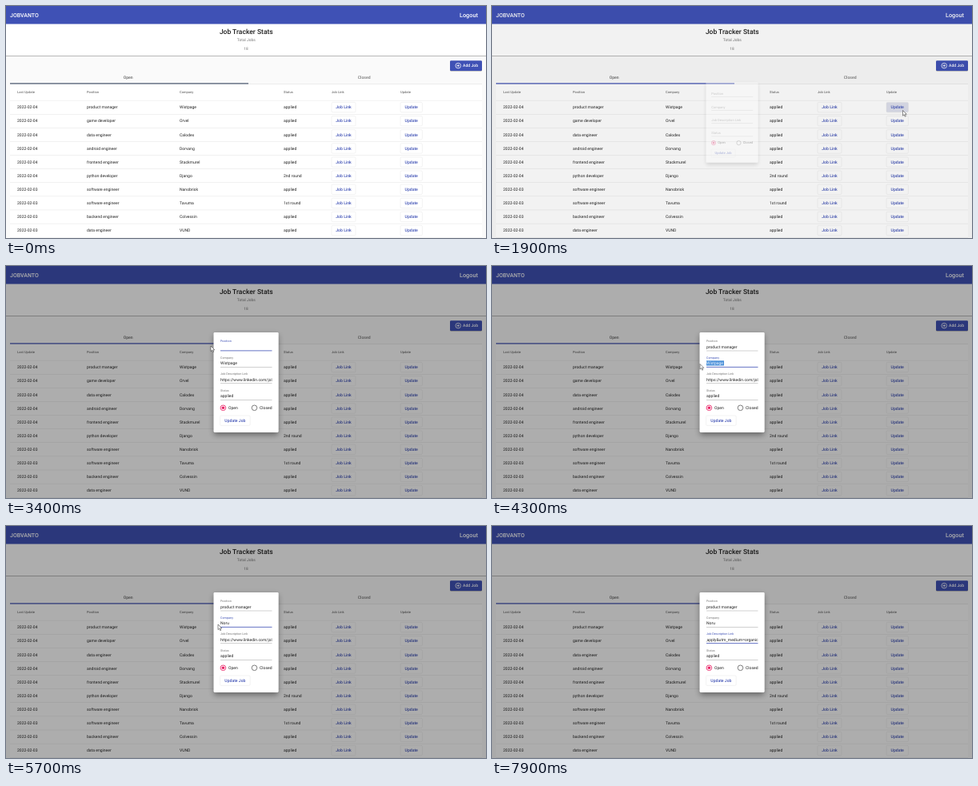
Write an HTML page that moves like this. It is 600 by 290 pixels and loops after 8000 ms.

```html
<!DOCTYPE html>
<html lang="en">
<head>
<title>Job Tracker</title>
<style>
  html, body { margin: 0; width: 100%; height: 100%; overflow: hidden; background: #fafafa; }
  svg { display: block; width: 600px; height: 290px; }
  text { font-family: Roboto, "Open Sans", sans-serif; text-rendering: geometricPrecision; white-space: pre; }
</style>
</head>
<body>
<svg id="stage" viewBox="0 0 600 290" xmlns="http://www.w3.org/2000/svg">
  <defs>
    <filter id="soft" x="-30%" y="-30%" width="160%" height="160%"><feGaussianBlur stdDeviation="3.5"/></filter>
    <filter id="thin" x="-10%" y="-30%" width="120%" height="170%"><feGaussianBlur stdDeviation="0.7"/></filter>
    <clipPath id="input"><rect x="267.8" y="84" width="64.8" height="90"/></clipPath>
  </defs>
  <g id="page"></g>
  <rect id="scrim" width="600" height="290" opacity="0"/>
  <g id="dialog"></g>
  <path id="cursor" d="M0 0V6.6L1.6 5.2L2.7 7.7L3.8 7.2L2.7 4.8H4.8Z" fill="#fff" stroke="#333" stroke-width=".55" stroke-linejoin="round"/>
</svg>
<script>
const LOOP = 8000, STEP = 100;
const INDIGO = '#3f51b5', PINK = '#e91e63', INK = '#212121', GRAY = '#757575';
const $ = id => document.getElementById(id);

// y is the vertical middle of the capitals
const text = (x, y, str, size = 5.05, fill = INK, extra = '') =>
  `<text x="${x}" y="${y + size * 0.35}" font-size="${size}" fill="${fill}" ${extra}>${str.replace(/&/g, '&amp;')}</text>`;
const rect = (x, y, w, h, fill, extra = '') =>
  `<rect x="${x}" y="${y}" width="${w}" height="${h}" fill="${fill}" ${extra}/>`;
const MID = 'text-anchor="middle"', BOLD = 'font-weight="500"';

const button = (x, y, w, label, id = '') =>
  rect(x, y - 6.2, w, 12.4, '#fff', `rx="1.4" stroke="#e0e0e0" stroke-width=".4" ${id}`) +
  text(x + w / 2, y, label, 5.1, INDIGO, `${MID} ${BOLD}`);

const columns = [14, 101, 217, 347, 407, 493];
const heads = ['Last Update', 'Position', 'Company', 'Status', 'Job Link', 'Update'];
const rows = [
  ['04', 'product manager', 'Wistpage', 'applied'],
  ['04', 'game developer', 'Orvel', 'applied'],
  ['04', 'data engineer', 'Calodex', 'applied'],
  ['04', 'android engineer', 'Dorvang', 'applied'],
  ['04', 'frontend engineer', 'Stackmurel', 'applied'],
  ['04', 'python developer', 'Django', '2nd round'],
  ['03', 'software engineer', 'Nanobrisk', 'applied'],
  ['03', 'software engineer', 'Tavuma', '1st round'],
  ['03', 'backend engineer', 'Colvessin', 'applied'],
  ['03', 'data engineer', 'VUND', 'applied'],
];

function drawPage() {
  let s = rect(0, 0, 600, 290, '#fafafa');
  s += rect(0, 22, 600, 41, '#000', 'opacity=".45" filter="url(#thin)"') + rect(0, 22, 600, 40.4, '#fff');
  s += rect(0, 0, 600, 22.5, INDIGO);
  s += text(5, 11.6, 'JOBVANTO', 7, '#fff', BOLD) + text(567, 11.6, 'Logout', 7.3, '#fff', BOLD);
  s += text(300.3, 32, 'Job Tracker Stats', 8.5, INK, `${MID} ${BOLD}`);
  s += text(300.3, 42, 'Total Jobs', 4.9, GRAY, MID) + text(300, 53.5, '18', 4.8, GRAY, MID);

  s += rect(555, 69, 40, 12.6, '#000', 'rx="1.4" opacity=".4" filter="url(#thin)"');
  s += rect(555, 68.3, 40, 12.6, INDIGO, 'rx="1.4"');
  s += '<g fill="none" stroke="#fff" stroke-width=".75"><circle cx="565.2" cy="74.6" r="3.3"/><path d="M563.4 74.6h3.6M565.2 72.8v3.6"/></g>';
  s += text(571, 74.6, 'Add Job', 5.1, '#fff', BOLD);

  s += text(152.7, 89.5, 'Open', 5.1, '#666', `${MID} ${BOLD}`) + text(447.7, 89.5, 'Closed', 5.1, '#777', `${MID} ${BOLD}`);
  s += rect(5, 98, 590, 192, '#fff') + rect(5, 97.4, 590, 0.4, '#d8d8d8');
  s += rect(5, 96.3, 298, 1.2, INDIGO, 'id="tabBar"');

  heads.forEach((h, i) => s += text(columns[i], 108, h, 4.1, GRAY, BOLD));
  rows.forEach(([day, ...cells], r) => {
    const y = 126.6 + r * 17.11;
    s += rect(5, y - 8.7, 590, 0.4, '#dcdcdc');
    ['2022-02-' + day, ...cells].forEach((c, i) => s += text(columns[i], y, c));
    s += button(407, y, 30, 'Job Link') + button(493, y, 27.4, 'Update', r ? '' : 'id="hover"');
  });
  s += rect(5, 289, 590, 0.4, '#dcdcdc');
  $('page').innerHTML = s;
}

const labels = ['Position', 'Company', 'Job Description Link', 'Status'];
const firstUrl = 'https://www.linkedin.com/jobs/view/';
const nextUrl = 'google_jobs_apply&utm_medium=organic';

// [start, value]; the last entry reached applies
const at = (table, t) => table.reduce((v, [start, value]) => t >= start ? value : v, table[0][1]);
const position = [[0, ''], [2000, 'product manager'], [3400, ''], [3700, 'product manager']];
const company = [[0, ''], [2000, 'Wistpage'], [4700, ''], [5000, 'N'], [5200, 'No'], [5300, 'Nor'], [5500, 'Noru']];
const link = [[0, ''], [2000, firstUrl], [7100, nextUrl]];
const focus = [[0, -1], [3000, 0], [4000, 1], [6200, 2]];
// [field, left edge, right edge]
const selection = [[0, null], [3100, [0, 286, 306.5]], [3300, [0, 268, 306.5]], [3400, null],
  [4100, [1, 279, 290]], [4200, [1, 268, 290]], [4700, null], [6400, [2, 268, 332.6]], [7100, null]];

function drawDialog(t) {
  const values = [at(position, t), at(company, t), at(link, t), t < 2000 ? '' : 'applied'];
  const active = at(focus, t), sel = at(selection, t), floats = t >= 2000;
  let s = rect(260, 86, 80, 125, '#000', 'rx="2" opacity=".42" filter="url(#soft)"');
  s += rect(259.5, 83, 81.2, 125, '#fff', 'rx="1.4"');

  labels.forEach((label, i) => {
    const y = 101 + i * 20.4, on = i === active;
    const marked = sel && sel[0] === i, end = values[i] === nextUrl;
    s += text(268, floats ? y - 7 : y, label, floats ? 3.78 : 5.05, on ? INDIGO : GRAY);
    s += rect(268, y + (on ? 4.5 : 4.8), 64.5, on ? 0.8 : 0.4, on ? INDIGO : '#8a8a8a');
    if (marked) s += rect(sel[1], y - 3.1, sel[2] - sel[1], 6.2, '#4a90d9');
    s += `<g clip-path="url(#input)">${text(end ? 332.7 : 268, y, values[i], 5.05, marked ? '#f4f8ff' : INK, end ? 'text-anchor="end"' : '')}</g>`;
  });

  s += `<g fill="none" stroke-width=".85"><circle cx="271.4" cy="177.3" r="3.3" stroke="${PINK}"/><circle cx="310.5" cy="177.3" r="3.3" stroke="#666"/></g>`;
  s += `<circle cx="271.4" cy="177.3" r="1.75" fill="${PINK}"/>`;
  s += text(278, 177.3, 'Open') + text(317, 177.3, 'Closed');
  s += button(267.6, 193.2, 37.6, 'Update Job');
  $('dialog').innerHTML = s;
}

// [time, x, y] of the pointer tip
const path = [
  [400, 540, 168], [900, 524, 148], [1400, 513.5, 130.5], [2200, 513.5, 130.5],
  [2900, 308, 99], [3300, 256, 100], [3500, 256, 100], [4000, 292, 121],
  [4300, 260, 122.5], [4500, 260, 122.5], [4700, 265, 123], [5700, 265, 123],
  [5900, 284, 150], [6200, 298, 139.5], [LOOP, 298, 139.5],
];

function pointerAt(t) {
  const i = Math.max(1, path.findIndex(p => p[0] > t));
  const [t0, x0, y0] = path[i - 1], [t1, x1, y1] = path[i];
  const p = Math.min(1, Math.max(0, (t - t0) / (t1 - t0)));
  const e = p * p * (3 - 2 * p);
  return [x0 + (x1 - x0) * e, y0 + (y1 - y0) * e];
}

function render(t) {
  const p = Math.min(1, Math.max(0, (t - 1855) / 140));
  const scale = 0.7 + 0.3 * (1 - Math.pow(1 - p, 1.1));
  $('scrim').setAttribute('opacity', 0.32 * Math.pow(p, 1.6));
  const dialog = $('dialog');
  dialog.setAttribute('opacity', p);
  dialog.setAttribute('transform', `translate(300 145.5) scale(${scale}) translate(-300 -145.5)`);
  if (p > 0) drawDialog(t);

  $('tabBar').setAttribute('fill', t < 200 ? '#4b5870' : INDIGO);
  $('hover').setAttribute('fill', t >= 1300 && t < 2000 ? '#dddfec' : '#fff');
  const cursor = $('cursor');
  cursor.setAttribute('visibility', t >= 400 && t < 7100 ? 'visible' : 'hidden');
  cursor.setAttribute('transform', `translate(${pointerAt(t).join(' ')})`);
}

drawPage();
const start = performance.now();
let shown = -1;
function tick() {
  const t = Math.floor(((performance.now() - start) % LOOP) / STEP) * STEP;
  if (t !== shown) render(shown = t);
  requestAnimationFrame(tick);
}
tick();
</script>
</body>
</html>
```
